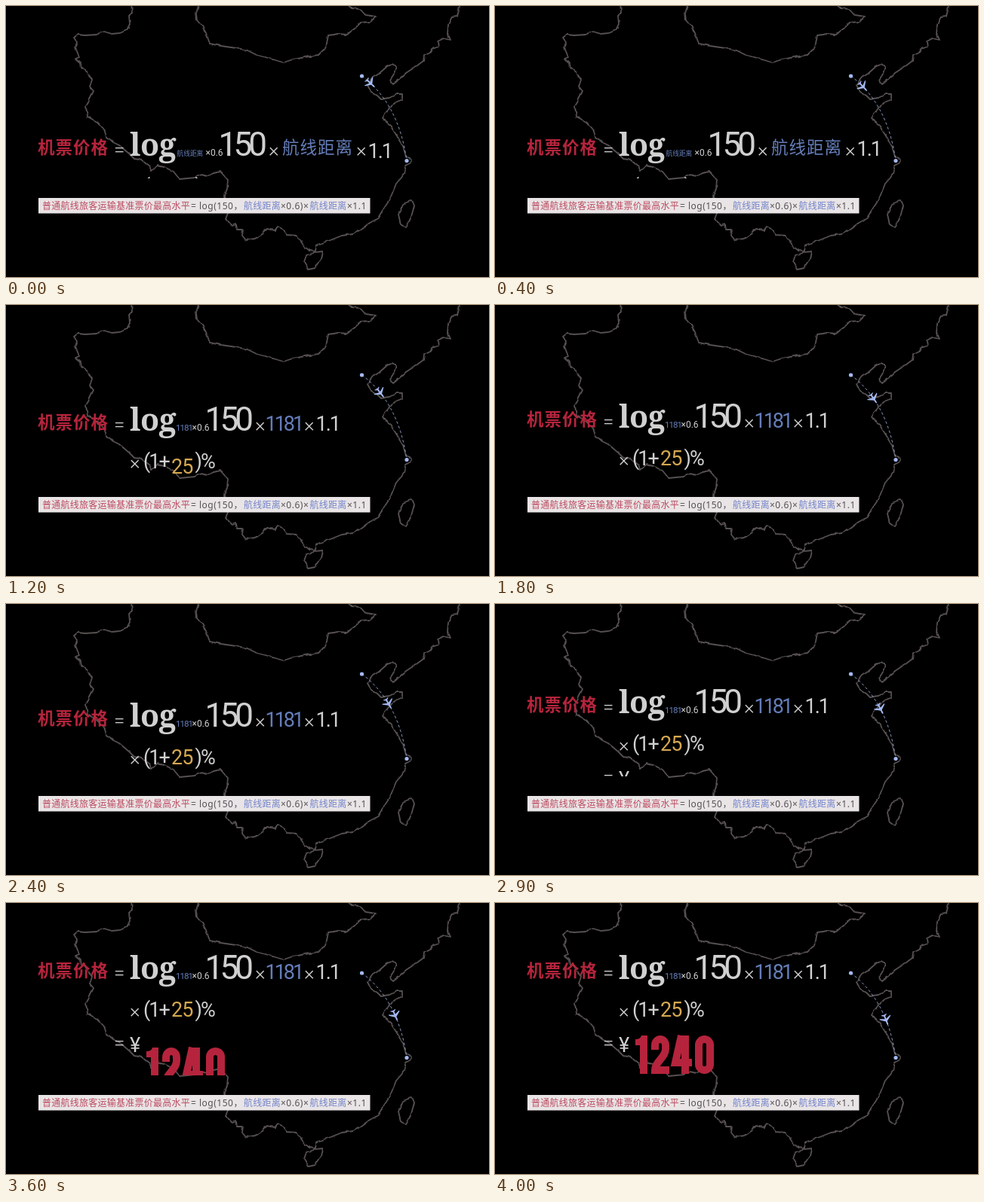
An HTML page that plays this animation: 640 px wide and 360 px high, repeating every 4100 ms.

```html
<!DOCTYPE html>
<html lang="zh-CN">
<head>
<meta charset="utf-8">
<title>机票价格</title>
<style>
  html, body { margin: 0; width: 100%; height: 100%; overflow: hidden; background: #000; }
  svg { display: block; width: 640px; height: 360px; }
  text { font: 300 26px Roboto, "Noto Sans CJK SC", sans-serif; fill: #d0d0d0; white-space: pre; }
  .cjk { font-family: "Noto Sans CJK SC", "Noto Sans CJK", sans-serif; font-weight: 700; }
  text.title { font-size: 22.5px; letter-spacing: 1px; fill: #b5243c; }
  text.log { font: 600 41px "Noto Serif", serif; letter-spacing: -.4px; }
  text.big { font-size: 44px; letter-spacing: -4.8px; font-weight: 400; }
  text.num { font-size: 27px; letter-spacing: -2px; font-weight: 400; }
  text.sub { font-size: 12px; font-weight: 400; }
  text.blue { fill: #647db9; }
  text.gold { fill: #d6a850; letter-spacing: -1px; }
  .banner text { font: 400 12px "Noto Sans", "Noto Sans CJK SC", sans-serif; letter-spacing: .5px; fill: #555055; }
  .banner text.cjk { font-family: "Noto Sans CJK SC", "Noto Sans CJK", sans-serif; letter-spacing: .25px; }
  .banner text.red { fill: #bc4a60; }
  .banner text.blue { fill: #7284cc; }
  .map { fill: none; stroke: #575051; stroke-width: 1.8; stroke-linejoin: round; }
  .total { fill: none; stroke: #b5243c; stroke-width: 10; }
  .flight { fill: #a4b9f2; }
</style>
</head>
<body>
<svg viewBox="0 0 640 360">
  <defs>
    <filter id="rough" x="0" y="0" width="640" height="360" filterUnits="userSpaceOnUse" color-interpolation-filters="sRGB">
      <feTurbulence type="fractalNoise" baseFrequency=".13" seed="4"/>
      <feDisplacementMap in="SourceGraphic" scale="4" xChannelSelector="R" yChannelSelector="G"/>
    </filter>
    <clipPath id="mask"><rect width="640" height="229"/></clipPath>
  </defs>

  <g class="map" filter="url(#rough)">
    <!-- western and southern border -->
    <path d="M166-4 167 9 163 13 164 24 160 32 151 36 140 37 129 34 120 38 105 39 95 38 90 42 94 48 92 55 97 68 92 70 99 76 100 82 108 89 114 98 111 107 116 113 110 125 106 134 108 147 121 154 130 164 133 173 142 181 150 185 163 196 170 203 180 205 190 213 193 219 200 212 210 214 222 220 230 230 250 228 258 224 268 226 275 222 284 220 294 231 293 242 290 252 291 265 294 275 291 283 300 292 305 290 306 297 314 297 313 305 318 311 330 309 340 302 346 296 356 298 360 293 368 297 372 304 385 305 390 312"/>
    <!-- coast and north-eastern border -->
    <path d="M390 312 396 320 402 325 410 326 411 318 418 315 430 311 445 305 460 303 470 297 482 288 492 283 500 270 508 258 513 246 517 236 524 228 530 219 528 212 536 208 538 203 530 200 527 190 522 179 515 168 508 157 499 150 502 143 508 136 516 128 526 124 526 117 518 117 508 122 497 124 492 119 484 114 479 104 486 95 494 90 503 82 512 77 518 82 513 92 509 98 512 104 521 97 530 89 545 79 553 73 554 66 562 62 565 57 573 54 572 47 580 43 588 45 585 38 586 25 590 15 598 14 602-4"/>
    <!-- northern border -->
    <path d="M256-4 252 10 253 19 260 27 265 36 270 50 285 53 305 56 320 59 332 65 344 68 356 72 368 75 380 71 396 68 414 65 424 55 427 39 440 37 452 38 462 30 470 22 483 21 490 14 477 12 470 4 458 3 450-4"/>
    <!-- islands -->
    <path d="M538 258 541 265 537 280 530 295 523 290 520 277 526 263zM395 340 398 331 408 328 420 327 418 336 410 348 401 350z"/>
  </g>

  <g class="flight">
    <path id="route" d="M471.500 93Q520 129 531 205.500" fill="none" stroke="#8f9dc4" stroke-dasharray="3.500 3"/>
    <circle cx="471.500" cy="93" r="2.600"/>
    <circle cx="531" cy="205.500" r="2.600"/>
    <path id="plane" d="M8 0Q8-1.100 6-1.100H2.500L-3-8.500H-4.500L-1.500-1.100H-5.500L-7.500-4H-8.500L-7.500 0-8.500 4H-7.500L-5.500 1.100H-1.500L-4.500 8.500H-3L2.500 1.100H6Q8 1.100 8 0z"/>
  </g>

  <g clip-path="url(#mask)">
    <g id="formula">
      <text class="cjk title" x="42" y="-3">机票价格</text>
      <text x="143" y="1">=</text>
      <text class="log" x="164">log</text>
      <text class="sub blue" id="smallDistance"></text>
      <g id="middle">
        <text class="sub" x="246.500">×0.6</text>
        <text class="big" x="263.500">150</text>
        <text x="330" y="1">×</text>
      </g>
      <text class="num blue" id="distance"></text>
      <g id="tail">
        <text x="395" y="1">×</text>
        <text class="num" id="factor" x="410.500">1.1</text>
      </g>
      <text x="164" y="51">×</text>
      <text class="num" x="182" y="50">(1+</text>
      <text class="num gold" id="percent" x="219" y="50">25</text>
      <text class="num" x="250.500" y="50">)%</text>
      <text x="143" y="94">=</text>
      <text class="num" x="164" y="97">¥</text>
    </g>
    <g id="total" class="total" role="img" aria-label="1240">
      <path d="M186 189V181Q193 181 194 176H202V227H192V189z" fill="#b5243c" stroke="none"/>
      <path d="M212 195V189a7 8 0 0 1 14 0V194C226 205 212 211 212 222H231"/>
      <path d="M252 227V176M247 176 239 212H261"/>
      <rect x="270" y="181" width="15" height="41" rx="7.500"/>
    </g>
  </g>

  <g class="banner">
    <rect x="43" y="255" width="439.500" height="20.500" fill="#e9e4e5"/>
    <text class="cjk red" x="48" y="270" style="font-weight:400">普通航线旅客运输基准票价最高水平</text>
    <text x="245" y="270">=</text>
    <text x="256" y="270">log(150，</text>
    <text class="cjk blue" x="315" y="270">航线距离</text>
    <text x="364" y="270">×0.6)×</text>
    <text class="cjk blue" x="402.500" y="270">航线距离</text>
    <text x="452" y="270">×1.1</text>
  </g>
</svg>
<script>
  const LOOP = 4100, STEP = 100, SWAP = 500;
  const el = id => document.getElementById(id);
  const route = el('route');

  // Smooth 0..1 over half a second
  const ease = (t, start) => {
    const p = Math.min(1, Math.max(0, (t - start) / 500));
    return p * p * (3 - 2 * p);
  };
  const move = (id, x, y) => el(id).setAttribute('transform', `translate(${x} ${y})`);

  function setText(id, text, x, size, spacing, cjk) {
    const node = el(id);
    node.textContent = text;
    node.setAttribute('x', x);
    node.style.fontSize = size + 'px';
    node.style.letterSpacing = spacing + 'px';
    node.classList.toggle('cjk', cjk);
  }

  function draw(t) {
    const named = t < SWAP;
    if (named) {
      setText('smallDistance', '航线距离', 226.5, 8.7, 0, true);
      setText('distance', '航线距离', 366, 22.5, 1, true);
    } else {
      setText('smallDistance', '1181', 225, 11.5, -1, false);
      setText('distance', '1181', 343.5, 27, -3, false);
    }
    move('middle', named ? 18 : 0, 0);
    move('tail', named ? 69 : 0, 0);
    el('distance').setAttribute('y', named ? -3 : 0);

    move('formula', 0, 199 - 36 * ease(t, 800) - 62 * ease(t, 2720));
    move('factor', 0, 12 * (1 - ease(t, -330)));
    move('percent', 0, 22 * (1 - ease(t, 900)));
    move('total', 0, 54 * (1 - ease(t, 3280)));

    const s = 15 + t * .0159;
    const a = route.getPointAtLength(s), b = route.getPointAtLength(s + 1);
    const angle = Math.atan2(b.y - a.y, b.x - a.x) * 180 / Math.PI;
    el('plane').setAttribute('transform', `translate(${a.x} ${a.y}) rotate(${angle}) scale(.9)`);
  }

  function tick() {
    draw(Math.floor(performance.now() % LOOP / STEP) * STEP);
    requestAnimationFrame(tick);
  }
  tick();
</script>
</body>
</html>
```
